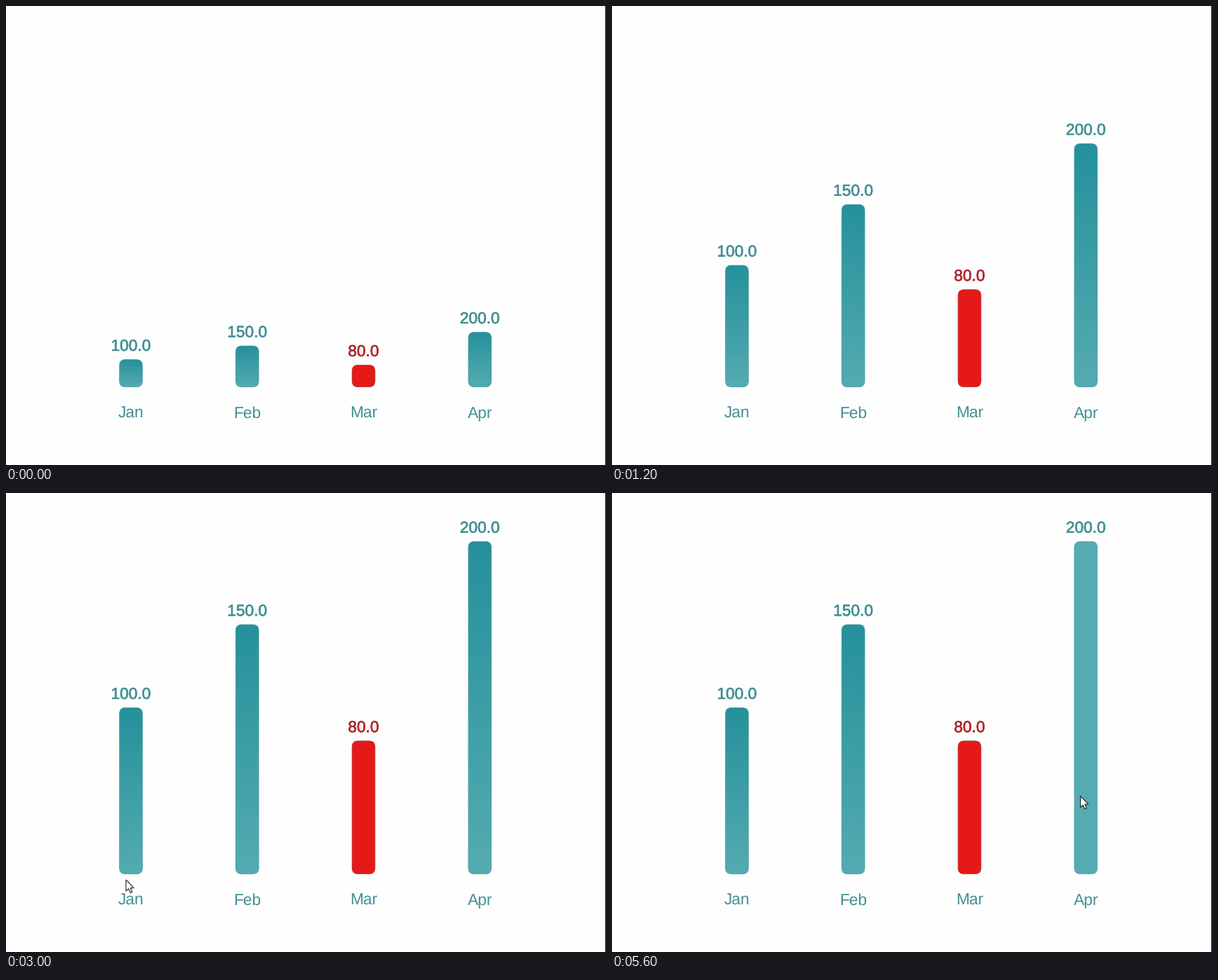
Write a matplotlib script that moves like this. It is 855 px wide and 655 px high and loops after 5.8 s.

```python
import numpy as np
import matplotlib.pyplot as plt
from matplotlib import patheffects
from matplotlib.animation import FuncAnimation
from matplotlib.colors import to_rgb
from matplotlib.patches import FancyBboxPatch, Polygon

W, H, DPI = 855, 655, 64
STEP, FRAMES = 100, 58
PX = 72 / DPI  # points per pixel

BASE, BAR_W, RADIUS = 543.6, 32.8, 8.5
PER_UNIT = 2.372  # bar pixels per unit of value
FIRST_X, GAP_X = 178, 165.75
DATA = {"Jan": 100, "Feb": 150, "Mar": 80, "Apr": 200}
LIMIT = 100  # values below this are shown in red

TEAL_TOP, TEAL_LOW, TEAL_EDGE, TEAL_TEXT = "#25919b", "#55abb1", "#4a9ca3", "#429093"
RED, RED_EDGE, RED_TEXT = "#e61919", "#913436", "#b0262c"

# pointer stops: time -> position, straight and steady between them
STOPS = {2500: (0, 430), 3000: (171, 552), 3600: (178, 520), 4100: (328.5, 502),
         4700: (505, 464), 4900: (505, 464), 5400: (667.5, 432.5)}
ARROW = np.array([(0, 0), (0, 16.2), (3.7, 12.7), (6.3, 18.6),
                  (8.8, 17.5), (6.3, 11.8), (11.2, 11.6)])

plt.rcParams["font.family"] = "Liberation Sans"
plt.rcParams["text.hinting"] = "none"
fig = plt.figure(figsize=(W / DPI, H / DPI), dpi=DPI, facecolor="#fefefe")
ax = fig.add_axes([0, 0, 1, 1])
ax.axis("off")

ramp = np.linspace(0, 1, 256)[:, None, None]
gradient = (1 - ramp) * np.array(to_rgb(TEAL_TOP)) + ramp * np.array(to_rgb(TEAL_LOW))


def growth(t):
    """Quadratic ease-out, already under way at the start of the loop."""
    left = np.interp(t, [0, 700, 1200, 2750], [0.914, 0.675, 0.518, 0])
    return 1 - left ** 2


def pointer_tip(t):
    if t < min(STOPS):
        return None
    xs, ys = zip(*STOPS.values())
    times = list(STOPS)
    return np.array([np.interp(t, times, xs), np.interp(t, times, ys)])


def label(x, y, text, color, size):
    return ax.text(x, y, text, color=color, fontsize=size * PX,
                   ha="center", va="baseline", zorder=4)


def rounded(left, **style):
    box = FancyBboxPatch((left, BASE - 20), BAR_W, 20,
                         boxstyle=f"round,pad=0,rounding_size={RADIUS}", **style)
    return ax.add_patch(box)


class Bar:
    def __init__(self, i, name, value):
        self.x = FIRST_X + i * GAP_X
        self.left = self.x - BAR_W / 2
        self.value = value
        low = value < LIMIT
        self.box = rounded(self.left, lw=0, fc=RED if low else TEAL_LOW, zorder=1)
        self.rim = rounded(self.left, lw=0.8 * PX, fc="none",
                           ec=RED_EDGE if low else TEAL_EDGE, alpha=0.8, zorder=3)
        self.fill = None
        if not low:
            self.fill = ax.imshow(gradient, aspect="auto", zorder=2,
                                  interpolation="bilinear")
            self.fill.set_clip_path(self.box)
        color = RED_TEXT if low else TEAL_TEXT
        self.text = label(self.x, 0, f"{value:.1f}", color, 22.7)
        self.text.set_path_effects(
            [patheffects.withStroke(linewidth=0.65 * PX, foreground=color)])
        label(self.x, 588, name, TEAL_TEXT, 22.8)

    def update(self, grown, tip):
        height = PER_UNIT * self.value * grown
        top = BASE - height
        for patch in (self.box, self.rim):
            patch.set_bounds(self.left, top, BAR_W, height)
        self.text.set_y(top - 12.6)
        if self.fill is not None:
            self.fill.set_extent((self.left, self.left + BAR_W, BASE, top))
            hover = (tip is not None and abs(tip[0] - self.x) <= BAR_W / 2
                     and top <= tip[1] <= BASE)
            self.fill.set_visible(not hover)


bars = [Bar(i, name, value) for i, (name, value) in enumerate(DATA.items())]
pointer = ax.add_patch(Polygon(ARROW, closed=True, fc="white", ec="#1c1c1c",
                               lw=1.1 * PX, joinstyle="miter", zorder=6))
ax.fill_between([W - 1, W], 0, H, color="black", lw=0, zorder=7)


def draw(n):
    t = n * STEP
    tip = pointer_tip(t)
    pointer.set_visible(tip is not None)
    if tip is not None:
        pointer.set_xy(ARROW + tip)
    for bar in bars:
        bar.update(growth(t), tip)
    ax.set_xlim(0, W)
    ax.set_ylim(H, 0)
    return []


anim = FuncAnimation(fig, draw, frames=FRAMES, interval=STEP,
                     init_func=lambda: draw(0), repeat=True, repeat_delay=0)
plt.show()
```
